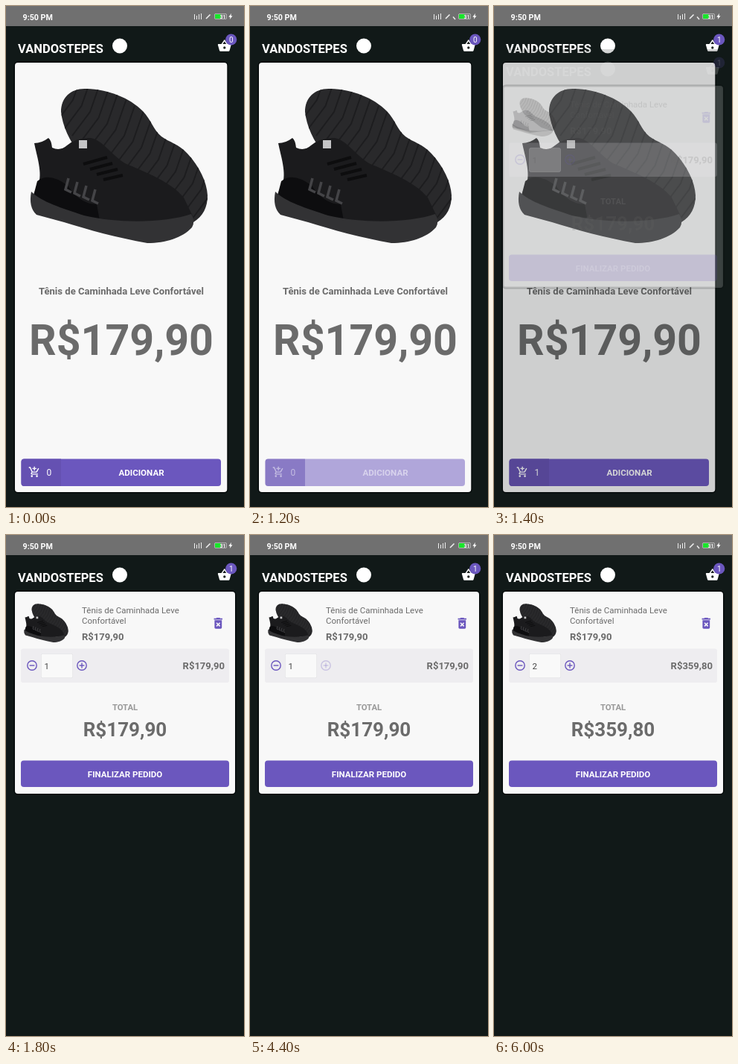
These frames come from a looping animation (320x672 px, 6600 ms). An HTML page with a canvas:

```html
<!DOCTYPE html>
<html lang="pt-BR">
<head>
<meta charset="utf-8">
<title>Carrinho</title>
<style>
html, body { margin: 0; height: 100%; overflow: hidden; background: #111918; }
canvas { display: block; width: 320px; height: 672px; }
</style>
</head>
<body>
<canvas id="stage" width="320" height="672"></canvas>
<script>
const ctx = document.getElementById('stage').getContext('2d');
const LOOP = 6600;
const BG = '#111918', PURPLE = '#6b57be', CARD = '#f8f8f8', GREY = '#6b6b6b';

const icons = {
  basket: 'M17.2 9l-4.4-6.6c-.4-.5-1.2-.5-1.6 0L6.8 9H2c-.6 0-1 .5-1 1.3l2.6 9.2c.2.9 1 1.5 1.9 1.5h13c.9 0 1.7-.6 1.9-1.5L23 10c0-.6-.4-1-1-1zM9 9l3-4.4L15 9zm3 8a2 2 0 1 1 0-4 2 2 0 0 1 0 4z',
  cart: 'M11 9h2V6h3V4h-3V1h-2v3H8v2h3zM7 18a2 2 0 1 0 0 4 2 2 0 0 0 0-4zm10 0a2 2 0 1 0 0 4 2 2 0 0 0 0-4zm-9.8-3.3l.9-1.7h7.4c.8 0 1.4-.4 1.8-1l3.9-7-1.8-1-3.9 7h-7L4.3 2H1v2h2l3.6 7.6-1.4 2.4c-.7 1.4.3 3 1.8 3h12v-2H7.4z',
  trash: 'M6 19c0 1.1.9 2 2 2h8c1.1 0 2-.9 2-2V7H6zm2.5-7.1l1.4-1.4 2.1 2.1 2.1-2.1 1.4 1.4-2.1 2.1 2.1 2.1-1.4 1.4-2.1-2.1-2.1 2.1-1.4-1.4 2.1-2.1zM15.5 4l-1-1h-5l-1 1H5v2h14V4z',
  bolt: 'M15 1L5 14h6l-2 9 10-13h-6z'
};

// Two overlapping trainers, in full-size card coordinates
const shoe = [
  ['#29292b', 'M74 142C74 122 88 110 108 111C138 112 166 123 184 141C196 154 198 166 209 175C220 183 232 185 244 198C260 215 270 236 271 254C271 270 265 282 252 290L190 270L100 200Q77 170 74 142Z'],
  ['#1b1b1d', 'M38 184Q48 184 57 177Q61 180 62 190Q73 195 82 187Q95 176 114 177C130 180 141 199 160 211C190 224 222 236 239 257L252 284L130 298L36 270Q33 258 43 240C50 225 41 200 38 184Z'],
  ['#0d0d0f', 'M42 235Q58 222 83 241Q100 266 122 266L126 288L60 274L36 258Z'],
  ['#323234', 'M34 249C48 263 75 271 105 281C150 292 215 291 249 279Q255 288 250 297C237 311 215 318 190 318C150 311 110 300 78 290L41 280Q30 270 34 249Z']
];

function withAlpha(a, draw) {
  ctx.save();
  ctx.globalAlpha *= a;
  draw();
  ctx.restore();
}

function box(x, y, w, h, fill, r = 0, stroke, width = 1) {
  ctx.beginPath();
  ctx.roundRect(x, y, w, h, r);
  if (stroke) {
    ctx.strokeStyle = stroke;
    ctx.lineWidth = width;
    ctx.stroke();
  }
  ctx.fillStyle = fill;
  ctx.fill();
}

function dot(x, y, r, fill) {
  ctx.beginPath();
  ctx.arc(x, y, r, 0, Math.PI * 2);
  ctx.fillStyle = fill;
  ctx.fill();
}

function line(color, width, ...p) {
  ctx.beginPath();
  for (let i = 0; i < p.length; i += 2) ctx.lineTo(p[i], p[i + 1]);
  ctx.strokeStyle = color;
  ctx.lineWidth = width;
  ctx.stroke();
}

function text(str, x, y, size, color, align = 'left', weight = 700) {
  ctx.font = `${weight} ${size}px Roboto, sans-serif`;
  ctx.textAlign = align;
  ctx.fillStyle = color;
  ctx.fillText(str, x, y);
}

function icon(name, x, y, scale, color) {
  ctx.save();
  ctx.translate(x, y);
  ctx.scale(scale, scale);
  ctx.fillStyle = color;
  ctx.fill(new Path2D(icons[name]));
  ctx.restore();
}

function shoes(x, y, scale) {
  ctx.save();
  ctx.translate(x, y);
  ctx.scale(scale, scale);
  shoe.forEach(([color, d], i) => {
    const path = new Path2D(d);
    ctx.fillStyle = color;
    ctx.fill(path);
    if (i) return;
    // sole ridges
    ctx.save();
    ctx.clip(path);
    for (let k = 0; k < 17; k++) {
      const cx = 84 + k * 11.5, cy = 118 + k * 8;
      line('#1d1d1f', 2, cx + 20, cy - 32, cx + 6, cy + 8, cx - 18, cy + 40);
    }
    ctx.restore();
  });
  for (let k = 0; k < 4; k++) {
    line('#444447', 3.5, 84 + k * 12, 231 + k * 5, 80 + k * 12, 246 + k * 5, 88 + k * 12, 250 + k * 5);
    line('#0d0d0e', 4, 104 + k * 9, 212 + k * 7, 136 + k * 7, 203 + k * 8);
  }
  box(98, 180, 11, 11, '#c4c4c6');
  ctx.restore();
}

function statusBar(busy) {
  box(0, 0, 320, 27, '#707070');
  text('9:50 PM', 22.5, 19, 10.7, '#fff');
  const x = busy ? 246 : 252;
  [7, 5, 7, 8].forEach((h, i) => line('#eee', 1, x + 1.5 + i * 3, 18 - h, x + 1.5 + i * 3, 18));
  line('#eee', 1.6, x + 17, 17, x + 22.5, 11.5);
  if (busy) line('#eee', 1.5, 273, 14.5, 276, 18);
  box(280.5, 10.5, 16, 7, '#777', 1.5, '#e4e4e4');
  box(281, 11, 8, 6, '#19e52b', 1);
  text('31', 291.5, 16.7, 7, '#fff', 'center');
  icon('bolt', 297.5, 9.5, .37, '#fff');
}

function header(count) {
  text('VANDOSTEPES', 16, 63, 16.5, '#fff');
  dot(153, 53.5, 10, '#fff');
  icon('basket', 284, 43.7, .816, '#fff');
  dot(302.7, 45, 7.6, PURPLE);
  text(count, 302.7, 48.6, 10, '#fff', 'center', 400);
}

function card(w, h) {
  box(12, 76, w, h, CARD, 4, '#050a0a', 3);
}

function productScreen(count, pressed) {
  box(0, 27, 320, 645, BG);
  header(count);
  card(285.3, 576);
  shoes(0, 0, 1);
  text('Tênis de Caminhada Leve Confortável', 155, 386.5, 13.06, GREY, 'center');
  text('R$179,90', 155, 468, 57.3, GREY, 'center');
  withAlpha(pressed ? .5 : 1, () => {
    box(20.5, 607.5, 268.5, 36.5, PURPLE, 4);
    box(20.5, 607.5, 53.5, 36.5, '#6551b2', [4, 0, 0, 4]);
    icon('cart', 30, 617, .68, '#fff');
    text(count, 54.5, 630, 12, '#fff', 'left', 400);
    text('ADICIONAR', 182, 630, 11.6, '#fff', 'center');
  });
}

function stepButton(x, plus) {
  ctx.beginPath();
  ctx.arc(x, 175, 6.2, 0, Math.PI * 2);
  ctx.strokeStyle = PURPLE;
  ctx.lineWidth = 1.4;
  ctx.stroke();
  line(PURPLE, 1.4, x - 3.4, 175, x + 3.4, 175);
  if (plus) line(PURPLE, 1.4, x, 171.6, x, 178.4);
}

function cartScreen(amount, pressed) {
  const total = amount === 1 ? 'R$179,90' : 'R$359,80';
  box(0, 27, 320, 645, BG);
  header(1);
  card(296, 271);
  shoes(16, 64.5, .25);
  text('Tênis de Caminhada Leve', 102, 105.3, 11.5, GREY, 'left', 400);
  text('Confortável', 102, 119.3, 11.5, GREY, 'left', 400);
  text('R$179,90', 102, 140.5, 13.06, GREY);
  icon('trash', 275.5, 108.6, .816, PURPLE);
  box(20, 152.5, 280, 45.5, '#eeedf0', 3);
  stepButton(35, false);
  withAlpha(pressed ? .28 : 1, () => stepButton(102, true));
  box(47.5, 159.5, 42, 32, '#f9f9f9', 2, '#dadadd');
  text(amount, 51.5, 180, 11.5, '#444', 'left', 400);
  text(total, 294, 180.3, 13.06, GREY, 'right');
  text('TOTAL', 160, 235.2, 11.3, '#999', 'center');
  text(total, 160, 270.3, 26, GREY, 'center');
  box(20, 302.5, 280, 35.5, PURPLE, 4);
  text('FINALIZAR PEDIDO', 160, 325, 11.5, '#fff', 'center');
}

function render(t) {
  const within = (a, b) => t >= a && t < b;
  if (t < 1600) productScreen(t < 1400 ? 0 : 1, within(1200, 1400));
  if (within(1400, 1600)) {
    // incoming screen: each layer is translucent on its own
    withAlpha(.18, () => {
      ctx.translate(0, 31);
      cartScreen(1, false);
    });
  }
  if (t >= 1600) cartScreen(t < 4600 ? 1 : 2, within(4400, 4600));
  statusBar(within(800, 1800) || within(4600, 4800) || within(5400, 5800) || t >= 6000);
}

let start;
function tick(now) {
  start ??= now;
  render((now - start) % LOOP);
  requestAnimationFrame(tick);
}
render(0);
requestAnimationFrame(tick);
</script>
</body>
</html>
```
